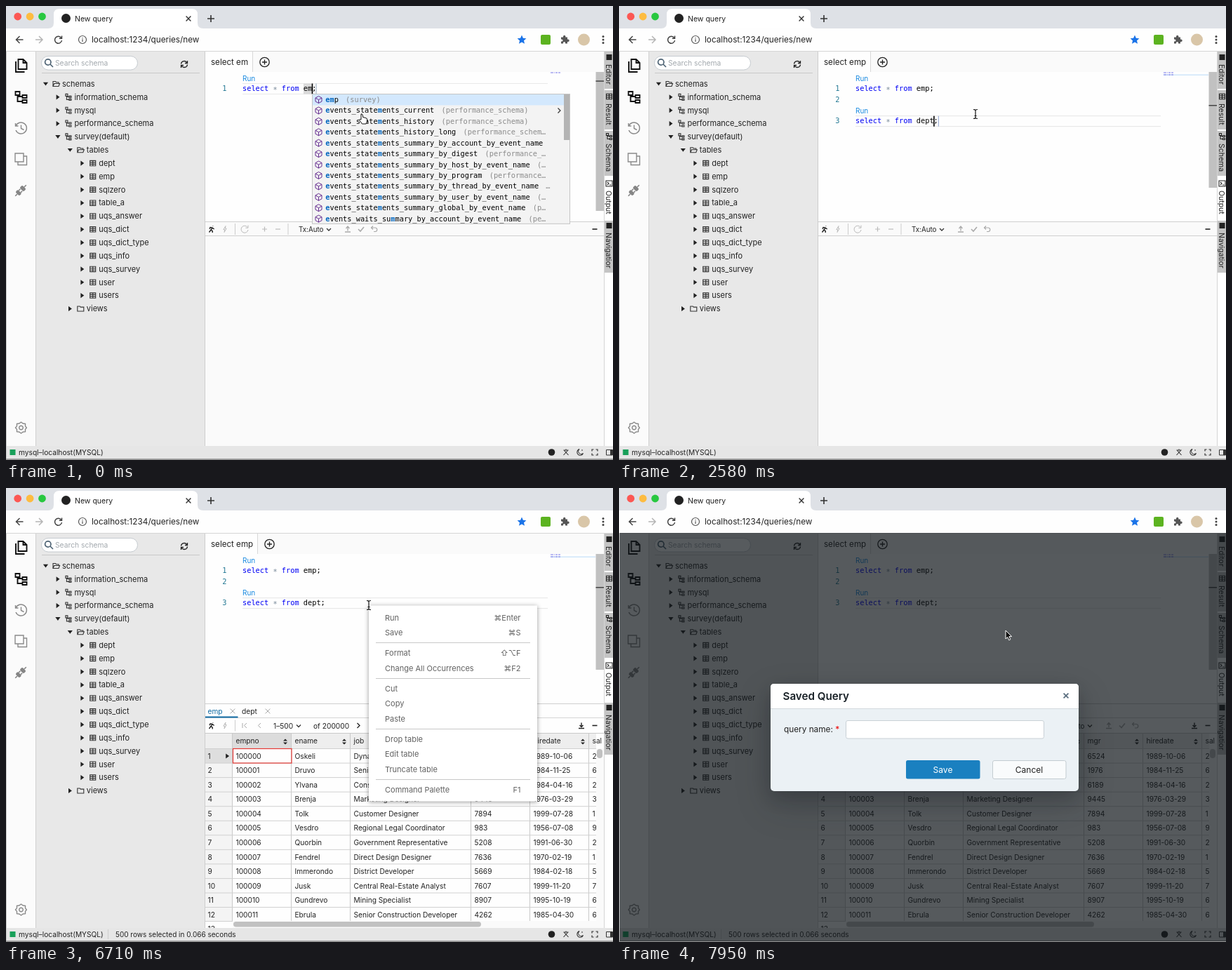
Recreate the animation shown at these times as an HTML page. Size 865 by 647 pixels, loop 8 s.

```html
<!DOCTYPE html>
<html lang="en">
<head>
<meta charset="utf-8">
<title>Query editor</title>
<style>
  html, body { margin: 0; width: 100%; height: 100%; overflow: hidden; background: #fff; }
  svg { display: block; width: 865px; height: 647px; }
  text { font: 11px Inter, "DejaVu Sans", sans-serif; fill: #222; white-space: pre; }
  .ten text, text.ten { font-size: 10.2px; }
  .mono text, text.mono { font: 10.3px "DejaVu Sans Mono", monospace; fill: #000; }
  .mono .key { fill: #0000f5; }
  .mono .star { fill: #778899; }
  .mono .match { fill: #0066bf; font-weight: bold; }
  .mono .note { fill: #8a8a8a; }
  .mono text.num { fill: #237893; }
  .mono text.lens { font: 10px Inter, sans-serif; fill: #1b8be0; }
  .raised { filter: drop-shadow(0 8px 12px rgba(16,22,26,.2)) drop-shadow(0 18px 23px rgba(16,22,26,.2)); }
</style>
</head>
<body>
<svg viewBox="0 0 865 647">
  <g id="frame"></g>
  <g id="live"></g>
</svg>
<script>
const LOOP = 8000, CH = 6.2, LEFT = 337, ROW = 15.42;

const rect = (x, y, w, h, fill, more = '') =>
  `<rect x="${x}" y="${y}" width="${w}" height="${h}" fill="${fill}" ${more}/>`;
const text = (x, y, s, more = '') => `<text x="${x}" y="${y}" ${more}>${s}</text>`;
const path = (d, stroke, more = '') => `<path d="${d}" fill="none" stroke="${stroke}" ${more}/>`;
const line = (x1, y1, x2, y2, color) => path(`M${x1},${y1}L${x2},${y2}`, color);
const dot = (x, y, r, fill, more = '') => `<circle cx="${x}" cy="${y}" r="${r}" fill="${fill}" ${more}/>`;

const shapes = {
  back: 'M5,0H-5M0,-5L-5,0L0,5',
  forward: 'M-5,0H5M0,-5L5,0L0,5',
  reload: 'M4.2,-2.6A5,5 0 1 0 5,1M5,-5.5V-1.8H1.3',
  plus: 'M-3.5,0H3.5M0,-3.5V3.5',
  newTab: 'M-5,0H5M0,-5V5',
  minus: 'M-3.5,0H3.5',
  cross: 'M-3.4,-3.4L3.4,3.4M3.4,-3.4L-3.4,3.4',
  info: 'M5.5,0A5.5,5.5 0 1 0 -5.5,0A5.5,5.5 0 1 0 5.5,0M0,-.7V3M0,-3V-1.8',
  down: 'M-3,-1.5L0,1.5L3,-1.5',
  right: 'M-1.5,-3.5L2,0L-1.5,3.5',
  left: 'M1.5,-3.5L-2,0L1.5,3.5',
  first: 'M2.5,-3.5L-1,0L2.5,3.5M-3.5,-3.5V3.5',
  last: 'M-2.5,-3.5L1,0L-2.5,3.5M3.5,-3.5V3.5',
  upload: 'M0,2.5V-3M-2.5,-1L0,-4L2.5,-1M-4,4H4',
  download: 'M0,-4V1.5M-2.5,-.5L0,2L2.5,-.5M-4,4H4',
  check: 'M-4,0L-1,3L4,-3',
  undo: 'M-2,-4.5L-4.5,-2L-2,.5M-4.5,-2H1.5A2.8,2.8 0 0 1 1.5,3.5H-1',
  run: 'M1.2,-2L-1,1L1.2,2.6V5M-1,1L-3.5,4.5M1.2,-2L-2,-2.4L-3,-.3M1.2,-2L3.6,0M1.8,-4.6v.6',
  bolt: 'M1,-4.5L-2.2,.7H-.2L-1,4.5L2.2,-1H.3Z',
  folder: 'M-4.5,-3.5H-1L0,-2.3H4.5V3.5H-4.5Z',
  openFolder: 'M-4.5,3.5V-3.5H-1L0,-2.3H3.5V-.5M-4.5,3.5L-2.8,-.5H5L3.5,3.5Z',
  schema: 'M-4,-4.5h3v3h-3zM1,-1.5h3v2h-3zM1,2.5h3v2h-3zM-2.5,-1.5V3.5H1M-2.5,-.5H1',
  grid: 'M-4,-3.7H4V3.7H-4ZM-4,-1.2H4M-4,1.3H4M0,-3.7V3.7',
  cube: 'M0,-5L4.5,-2.5V2.5L0,5L-4.5,2.5V-2.5ZM-4.5,-2.5L0,0L4.5,-2.5M0,0V5',
  snippet: 'M-5,-5H5V5H-5Z',
  keyword: 'M-5,-4H1M3,-4H5M-5,-1.3H-2M0,-1.3H5M-5,1.3H3M-5,4H0M2,4H5',
  files: 'M-4,-9H3L8,-4V5H-4ZM3,-9V-4H8M-7.5,-6V9H5',
  tree: 'M-8,-8h6v5h-6zM2,-3h6v4h-6zM2,4h6v4h-6zM-5,-3V6H2M-5,-1H2',
  history: 'M-7.5,-3A8,8 0 1 1 -7.5,3M-8,-7V-3H-4M0,-4.5V.5L4,2.5',
  copy: 'M-8,-8H4V4H-8ZM-4,4V8.5H8.5V-4H4',
  gear: 'M7.8,0L6,2.4L6,5.6L2.8,6L0,8L-2.8,6L-6,5.6L-6,2.4L-8,0L-6,-2.4L-6,-5.6L-2.8,-6L0,-8L2.8,-6L6,-5.6L6,-2.4ZM2.8,0A2.8,2.8 0 1 0 -2.8,0A2.8,2.8 0 1 0 2.8,0',
  terminal: 'M-4.5,-4H4.5V4H-4.5ZM-2.5,-2L-.5,0L-2.5,2M.5,2H3',
  expand: 'M-4,-1.5V-4H-1.5M1.5,-4H4V-1.5M4,1.5V4H1.5M-1.5,4H-4V1.5',
  moon: 'M-1,-4.5A4.5,4.5 0 1 0 4.5,1.5A4,4 0 0 1 -1,-4.5ZM2,-3h2',
  translate: 'M-3.5,-3H3.5M0,-4.5V-3M-2.5,-2.5L3.5,4M2.5,-2.5L-3.5,4',
  lens: 'M3,-1A4.2,4.2 0 1 0 -5.4,-1A4.2,4.2 0 1 0 3,-1M2,2L6,6'
};
const icon = (name, x, y, color = '#333', width = 1) =>
  path(shapes[name], color, `stroke-width="${width}" transform="translate(${x},${y})"`);
const solid = (d, x, y, fill = '#222') => `<path d="${d}" fill="${fill}" transform="translate(${x},${y})"/>`;
const ARROW_RIGHT = 'M-2.3,-3.6L2.6,0L-2.3,3.6Z', ARROW_DOWN = 'M-3.6,-2.3H3.6L0,2.6Z';

function browser() {
  let s = rect(0, 0, 865, 647, '#fefefe') + rect(0, 0, 865, 32, '#dee1e6');
  ['#fc5753', '#fdbc40', '#28c840'].forEach((c, i) => s += dot(16.7 + i * 17.4, 15, 5.4, c));
  s += '<path d="M60,32Q68,32 68,24V12Q68,4 76,4H265Q273,4 273,12V24Q273,32 281,32Z" fill="#fff"/>';
  s += dot(85.5, 17.5, 6.5, '#222') + text(98, 21.5, 'New query', 'style="font-size:10.5px"');
  s += icon('cross', 260, 18, '#333', 1.4) + icon('newTab', 292, 18, '#333', 1.6);
  s += icon('back', 19.5, 48, '#444', 1.5) + icon('forward', 47, 48, '#b5b5b5', 1.5);
  s += icon('reload', 74.5, 48, '#444', 1.5) + icon('info', 109, 48, '#555', 1.2);
  s += text(122, 52, 'localhost:1234/queries/new', 'style="font-size:11.75px"');
  s += solid('M0,-6.5L1.9,-2.2L6.4,-1.8L3,1.3L4,5.8L0,3.4L-4,5.8L-3,1.3L-6.4,-1.8L-1.9,-2.2Z', 735, 48, '#1a73e8');
  s += rect(762, 41, 14, 14, '#5cb320', 'rx="2"');
  s += solid('M-5,-3H-2V-4A1.7,1.7 0 0 1 1.4,-4V-3H4V0H5A1.7,1.7 0 0 1 5,3.4H4V6H1V5A1.5,1.5 0 0 0 -2,5V6H-5V3H-4A1.5,1.5 0 0 0 -4,0H-5Z', 796, 47.5, '#555');
  s += dot(823.5, 48, 8.5, '#d9c6a8');
  [-4.5, 0, 4.5].forEach(d => s += dot(851, 48 + d, 1.5, '#444'));
  return s + line(0, 64.5, 865, 64.5, '#d5d5d5');
}

function sidebar() {
  let s = rect(0, 65, 42, 562, '#fbfbfb') + rect(42, 65, 242, 562, '#e8e8e8');
  s += line(42.5, 65, 42.5, 627, '#d0d0d0') + line(283.5, 65, 283.5, 627, '#cdcdcd');
  s += icon('files', 21.5, 85, '#111', 1.9) + icon('tree', 21.5, 130, '#111', 1.9);
  s += icon('history', 21.5, 174, '#8a8a8a', 1.4) + icon('copy', 21, 218, '#8a8a8a', 1.4);
  s += `<g transform="translate(21,263) rotate(-45)">${rect(-7, -4, 5, 8, '#858585', 'rx="2"')}${rect(1.5, -4, 5.5, 8, '#858585', 'rx="2"')}` +
    path('M-11,0H-7M7,0H11M-2,-2H1M-2,2H1', '#858585', 'stroke-width="1.6"') + '</g>';
  s += icon('gear', 21.5, 601, '#888', 1.4);
  s += rect(50.5, 71.5, 137, 19.5, '#fff', 'rx="9.7" stroke="#c6cbd0"') + icon('lens', 61, 81, '#4f6475', 1.7);
  s += text(70, 85, 'Search schema', 'style="font-size:10.3px;fill:#a3a9ae"');
  s += path('M-4.5,-.5A4.5,4.5 0 0 1 4,-2M4.5,-5V-1.5H1M4.5,.5A4.5,4.5 0 0 1 -4,2M-4.5,5V1.5H-1', '#222', 'stroke-width="1.3" transform="translate(254,83)"');
  s += line(51, 95.5, 276, 95.5, '#c9c9c9');
  const tables = 'dept emp sqlzero table_a uqs_answer uqs_dict uqs_dict_type uqs_info uqs_survey user users'.split(' ');
  const nodes = [[0, 'schemas', 'openFolder', 1], [1, 'information_schema', 'schema'], [1, 'mysql', 'schema'],
    [1, 'performance_schema', 'schema'], [1, 'survey(default)', 'schema', 1], [2, 'tables', 'openFolder', 1],
    ...tables.map(n => [3, n, 'grid']), [2, 'views', 'folder']];
  nodes.forEach(([depth, name, shape, open], i) => {
    const x = 56.5 + depth * 17.4, y = 111 + i * 18.85;
    s += solid(open ? ARROW_DOWN : ARROW_RIGHT, x, y) + icon(shape, x + 15, y, '#333', 1.1) + text(x + 23.5, y + 3.8, name);
  });
  return s;
}

function rightStrip() {
  const tabs = [['Editor', 65, 118, 83], ['Result', 120, 176, 139, 'grid'], ['Schema', 178, 242, 196, 'schema'],
    ['Output', 244, 305, 263, 'terminal'], ['Navigatior', 306, 380, 323]];
  let s = rect(852, 65, 13, 562, '#fff');
  for (const [name, top, bottom, y, shape] of tabs) {
    s += rect(852.5, top, 13, bottom - top, name === 'Output' ? '#fff' : '#c4c4c4');
    s += shape ? icon(shape, 859.5, y - 10, '#222', 1.1) : rect(855.5, y - 14, 8, 8, '#222');
    s += `<text transform="translate(855.3,${y}) rotate(90)" style="font-size:10.5px">${name}</text>`;
  }
  return s + line(852.5, 65, 852.5, 627, '#d5d5d5');
}

function statusBar() {
  let s = rect(0, 627, 865, 18, '#e6e6e6') + rect(0, 645, 865, 2, '#9a9a9a') + rect(0, 65, 1, 580, '#c8c8c8');
  s += rect(5.5, 632, 8, 8, '#19a05a') + text(18, 639.5, 'mysql–localhost(MYSQL)', 'class="ten"');
  s += dot(777.5, 636, 4.8, '#222') + icon('translate', 798, 636, '#333', 1.1) + icon('moon', 818, 636, '#333', 1.1);
  return s + icon('expand', 839, 636, '#333', 1.2) + path('M855.5,632.5H864.5V640H855.5Z', '#333') + rect(861, 633, 3, 7, '#333');
}

const keywords = s => s.replace(/select|from/g, '<tspan class="key">$&</tspan>')
  .replace('* ', '<tspan class="star" dy="1.8">*</tspan><tspan dy="-1.8"> </tspan>');

function highlight(name, typed) {
  let i = 0;
  return [...name].map(c => c === typed[i] ? (i++, `<tspan class="match">${c}</tspan>`) : c).join('');
}

function popup(x, y, typed, rows) {
  const h = rows.length * ROW, long = rows.length > 9;
  let s = rect(x + .5, y + .5, 367, h - .2, '#f3f3f3', 'stroke="#c4c4c4"') + rect(x + 1, y + 1, long ? 358 : 366, ROW, '#d3e8fd');
  rows.forEach(([name, note, shape = 'cube'], i) => {
    const base = y + 12 + i * ROW, noteX = x + 29.5 + name.length * CH;
    s += icon(shape, x + 9.5, base - 3.5, shape === 'cube' ? '#652d90' : '#444', shape === 'snippet' ? .8 : 1);
    s += text(x + 19.3, base, highlight(name, typed));
    if (shape !== 'cube') return s += note ? text(x + 359, base, note, 'text-anchor="end" style="fill:#555"') : '';
    const full = `(${note})`, room = Math.floor((x + 335 - noteX) / CH);
    if (noteX < x + 335) s += text(noteX, base, full.length > room ? full.slice(0, Math.max(0, room - 1)) + '…' : full, 'class="note"');
  });
  return s + (long ? rect(x + 359, y + 1, 8, 65, '#b4b4b4') : '');
}

const PS = 'performance_schema';
const events = 'current history history_long summary_by_account_by_event_name summary_by_digest summary_by_host_by_event_name summary_by_program summary_by_thread_by_event_name summary_by_user_by_event_name summary_global_by_event_name'
  .split(' ').map(n => ['events_statements_' + n, PS]);
const inSchema = (schema, names) => names.split(' ').map(n => [n, schema]);
const lists = {
  em: [['emp', 'survey'], ...events, ['events_waits_summary_by_account_by_event_name', PS]],
  sel: [['sel', 'select * from t;', 'snippet'], ['select', '', 'keyword'], ['selc', '', 'snippet'], ['selw', '', 'snippet']],
  t: [['table_a', 'survey'], ...inSchema(PS, 'table_handles table_io_waits_summary_by_index_usage table_io_waits_summary_by_table table_lock_waits_summary_by_table threads'),
    ...inSchema('mysql', 'tables_priv time_zone time_zone_leap_second time_zone_name time_zone_transition time_zone_transition_type')],
  d: [['dept', 'survey'], ...inSchema('mysql', 'db default_roles'), ...inSchema(PS, 'data_lock_waits data_locks'), ['uqs_dict', 'survey'], ['uqs_dict_type', 'survey'],
    ...events.slice(4, 5), ...inSchema(PS, 'metadata_locks threads user_defined_functions prepared_statements_instances')],
  de: [['dept', 'survey'], ['default_roles', 'mysql'], ...events.slice(4, 5),
    ...inSchema(PS, 'user_defined_functions variables_by_thread events_errors_summary_by_user_by_error events_errors_summary_by_thread_by_error events_errors_summary_by_host_by_error')]
};

// Each step: start, third line's text, caret line, caret column, suggestion list.
const typing = [
  [0, '', 1, 16, 'em'], [170, '', 1, 17], [620, '', 1, 18], [890, '', 2, 0], [1070, '', 3, 0],
  [1250, 's', 3, 1, 'sel'], [1430, 'se', 3, 2, 'sel'], [1520, 'sel', 3, 3, 'sel'],
  [1780, 'select * from t;', 3, 15], [1870, 'select * from t;', 3, 15, 't'],
  [2140, 'select * from d;', 3, 15, 'd'], [2220, 'select * from de;', 3, 16, 'de'],
  [2580, 'select * from dept;', 3, 18], [3030, 'select * from dept;', 3, 19]
];
const pointer = [
  [0, 'hand', 508, 160], [170, 'beam', 508, 154], [3740, 'beam', 511, 155], [3830, 'beam', 515, 157], [3920, 'beam', 518, 160],
  [4010, 'beam', 518, 163], [4190, 'beam', 513, 176], [4270, 'beam', 508, 183], [6010, 'beam', 509, 180], [6100, 'beam', 512, 176],
  [6180, 'beam', 515, 170], [6270, 'beam', 517, 167], [6890, 'arrow', 523, 168], [6980, 'arrow', 532, 180], [7060, 'arrow', 541, 192],
  [7140, 'arrow', 547, 199], [7230, 'arrow', 551, 203]
];
const caretHidden = [[3570, 4010], [4540, 5020], [5740, 6010], [6530, LOOP]];
const within = (t, a, b) => t >= a && t < b;
const at = (steps, t) => steps.findLast(s => s[0] <= t);

function editor(t) {
  const [start, third, row, col, list] = at(typing, t);
  const lensed = t >= 1870, lines = start < 890 ? 1 : start < 1070 ? 2 : 3;
  const top = n => 110 + (n - 1) * 15.4 + (n === 3 && lensed ? 15.4 : 0);
  const tab = t >= 260 ? 358.5 : 351.5, y = top(row), x = LEFT + col * CH;
  let s = rect(284, 65, 568, 29, '#fafafa') + rect(284, 65, tab - 284, 29, '#fefefe') + line(tab, 65, tab, 94, '#d8d8d8');
  s += text(292, 84, t >= 260 ? 'select emp' : 'select em', 'style="font-size:11.6px"');
  s += dot(tab + 17, 80, 6.7, 'none', 'stroke="#222" stroke-width="1.3"') + icon('plus', tab + 17, 80, '#222', 1.4);
  s += '<g class="mono">' + path(`M${LEFT},${y + .5}H772M${LEFT},${y + 15.5}H772`, '#e9e9e9', 'stroke-width="1.2"');
  if (start === 0) s += rect(424, 110.5, 12.5, 15, '#dadada') + rect(441.5, 110.5, 1, 15, '#8fa3b8');
  if (within(t, 1780, 2140)) s += rect(LEFT + 14 * CH, y + .5, CH, 15, '#add6ff');
  if (within(t, 1780, 3030)) s += rect(LEFT + third.length * CH, y + .5, 1, 15, '#8fa3d0');
  s += text(LEFT, 107, 'Run', 'class="lens"') + (lensed ? text(LEFT, 153, 'Run', 'class="lens"') : '');
  s += text(LEFT, 121.2, keywords(`select * from ${t < 170 ? 'em' : 'emp'};`)) + text(LEFT, top(3) + 11.2, keywords(third));
  for (let n = 1; n <= lines; n++) s += text(308.3, top(n) + 11.2, n, 'class="num"');
  if (!caretHidden.some(([a, b]) => within(t, a, b))) s += rect(x - .5, y + .5, 1.6, 15, '#000');
  const thumb = [198, 185, 173][lines - 1] - (lensed ? 8 : 0);
  s += rect(840.5, 94, 11.5, thumb, '#c1c1c1') + rect(840.5, lensed ? 141 : 93.5 + 12.8 * lines, 11.5, 1.5, '#444');
  const mini = n => path(`M776,${n}h15`, '#7777e8', 'stroke-dasharray="4 1 1 1 3 1 3"');
  s += mini(95) + (lines > 2 ? rect(776, 97.5, 64, 1.5, '#cfe6fa') : '') + (third.length > 5 ? mini(98) : '') + '</g>';
  if (!list) return s;
  const typed = list === 'sel' ? third : list === 't' ? '' : list;
  s += `<g class="mono">${popup(Math.round(x), Math.round(y + 15.2), typed, lists[list])}</g>`;
  return s + (list === 'em' ? icon('right', 788, 149, '#333', 1.2) : '');
}

function actions(dx, dy, active) {
  const y = 318 + dy, on = active ? '#333' : '#bbb';
  let s = icon('reload', 340 + dx, y, on) + icon('plus', 368.5 + dx, y, on, 1.2) + icon('minus', 387.5 + dx, y, on, 1.2);
  s += line(402 + dx, y - 8, 402 + dx, y + 8, '#ccc') + text(417 + dx, y + 4, 'Tx:Auto', 'style="font-size:9.8px"') + icon('down', 460 + dx, y + .5, '#333', 1.3);
  s += icon('upload', 487 + dx, y, '#aaa', 1.3) + icon('check', 506 + dx, y, '#aaa', 1.6) + icon('undo', 525 + dx, y, '#aaa', 1.2);
  return s + icon('minus', 839, y, '#222', 1.6);
}

const runIcons = (y, on) => icon('run', 293, y, on ? '#128a12' : '#222', 1.4) +
  icon('bolt', 312, y, on ? '#e8112d' : '#bbb', on ? 1.8 : 1) + line(326.5, y - 8, 326.5, y + 8, '#ccc');

function output(t) {
  let s = rect(284, 308, 568, 319, '#fafafa') + line(284, 307.5, 852, 307.5, '#cfcfcf') + line(284, 327.5, 852, 327.5, '#cfcfcf');
  s += runIcons(318, t >= 5020) + actions(0, 0, false);
  if (t < 5020) return s;
  s += rect(686, 632, 77, 7.5, '#1479bd', 'rx="3.7"');
  for (let x = 690; x < 757; x += 9) s += path(`M${x},639l5,-6.5`, '#3c97d0', 'stroke-width="3"');
  if (t < 5110) return s;
  return s + dot(552, 497, 19, '#f0f', 'opacity=".25" style="filter:blur(6px)"') + rect(542.5, 452, 50.5, 51, '#f0f') +
    rect(543, 486.5, 16, 16, '#16a9fb', 'stroke="#a070ff" stroke-width=".7"');
}

const columns = [['empno', 323], ['ename', 407], ['job', 491], ['mgr', 663], ['hiredate', 747], ['sal', 831]];
const people = `Oskeli|Dynamic Planner|6524|1989-10-06|2
Druvo|Senior Hospitality Architect|1976|1984-11-25|6
Ylvana|Consulting Engineer|6189|1984-04-16|2
Brenja|Marketing Designer|9445|1976-03-29|3
Tolk|Customer Designer|7894|1999-07-28|1
Vesdro|Regional Legal Coordinator|983|1956-07-08|9
Quorbin|Government Representative|5208|1991-06-30|2
Fendrel|Direct Design Designer|7636|1970-02-19|1
Immerondo|District Developer|5669|1984-02-18|5
Jusk|Central Real-Estate Analyst|7607|1999-11-20|7
Gundrevo|Mining Specialist|8907|1995-10-19|6
Ebrula|Senior Construction Developer|4262|1985-04-30|6`.split('\n').map((r, i) => [100000 + i, ...r.split('|')]);

const results = (() => {
  let s = '<g class="ten">' + rect(284, 308, 568, 319, '#fefefe') + line(284, 307.5, 852, 307.5, '#cfcfcf') + line(284, 327.5, 852, 327.5, '#d5d5d5');
  s += text(287.5, 321.5, 'emp', 'style="fill:#106ba3"') + text(336, 321.5, 'dept') + rect(284, 325.5, 46.5, 2, '#106ba3');
  s += icon('cross', 323, 318, '#aaa') + icon('cross', 373, 318, '#aaa') + runIcons(338.5, false);
  s += icon('first', 340.5, 338.5, '#aaa') + icon('left', 361.5, 338.5, '#aaa') + text(381, 342.5, '1–500') + icon('down', 417, 339, '#333', 1.3);
  s += text(438, 342.5, 'of 200000') + icon('right', 502, 338.5, '#222', 1.3) + icon('last', 523, 338.5, '#222', 1.3) + line(537.5, 330, 537.5, 347, '#ccc');
  s += actions(211, 20.5, true) + icon('download', 820, 338.5, '#222', 1.4);
  s += rect(284, 349, 557, 22, '#eee') + rect(323, 349, 84, 22, '#dcdcdc') + rect(284, 371, 39, 246, '#f4f4f4') + rect(284, 371, 39, 21, '#dedede');
  columns.forEach(([name, x], i) => {
    s += text(x + 4.5, 364, name) + line(x - .5, 349, x - .5, 617, '#c9c9c9');
    if (i < 5) s += solid('M-3,-1H3L0,-4ZM-3,1H3L0,4Z', columns[i + 1][1] - 9, 361.5);
  });
  people.forEach((cells, r) => {
    const y = 371.5 + r * 20.55;
    s += line(284, y, 841, y, '#d0d0d0') + text(287.5, y + 14.2, r + 1);
    cells.forEach((c, i) => s += text(columns[i][1] + 4.5, y + 14.2, c));
  });
  s += line(284, 349.5, 852, 349.5, '#c9c9c9') + rect(323.5, 371.5, 83.5, 20.5, 'none', 'stroke="#e53935" stroke-width="1.2"') + solid(ARROW_RIGHT, 315.5, 382);
  s += rect(323, 617, 529, 10, '#fafafa') + rect(324, 618, 353, 7.5, '#c1c1c1', 'rx="3.7"') + rect(841, 371, 11, 246, '#fafafa') + rect(842, 372, 8, 13, '#c1c1c1', 'rx="4"');
  s += line(284, 617.5, 323, 617.5, '#d0d0d0') + '<svg x="284" y="618" width="39" height="9" style="width:39px;height:9px">' + text(3.5, 14, 13) + '</svg>';
  return s + line(145.5, 629, 145.5, 643, '#cfcfcf') + text(156, 639.5, '500 rows selected in 0.066 seconds', 'style="font-size:10px"') + '</g>';
})();

const menuItems = [['Run', 184.5, '⌘Enter'], ['Save', 206, '⌘S'], ['Format', 235, '⇧⌥F'], ['Change All Occurrences', 256.8, '⌘F2'],
  ['Cut', 286], ['Copy', 307.3], ['Paste', 328.7], ['Drop table', 357.7], ['Edit table', 379.3], ['Truncate table', 401], ['Command Palette', 430, 'F1']];
function menu(t) {
  const hovered = t < 6980 ? '' : t < 7140 ? 'Run' : 'Save';
  let s = rect(517, 167.5, 240, 279, '#fff', 'style="filter:drop-shadow(0 1px 3px rgba(0,0,0,.4))"');
  for (const y of [220.5, 271.5, 343.5, 415.5]) s += line(527, y, 747, y, '#c8c8c8');
  for (const [name, y, keys = ''] of menuItems) {
    const fill = `style="fill:${name === hovered ? '#fff' : '#616161'}"`;
    if (name === hovered) s += rect(518, y - 10.7, 238, 21.4, '#0060c0');
    s += text(540, y + 4, name, fill) + text(733.5, y + 4, keys, 'text-anchor="end" ' + fill);
  }
  return s;
}

function dialog(t) {
  const done = t >= 7950;
  let s = rect(1, 64, 864, 582, '#10161a', `opacity="${done ? .7 : .35}"`);
  s += `<g opacity="${done ? 1 : .6}" transform="translate(435.5,355.5) scale(${done ? 1 : .85}) translate(-435.5,-355.5)">`;
  s += rect(216, 279, 439, 153, '#ebf1f5', 'rx="5" class="raised"');
  s += '<path d="M216,314V284Q216,279 221,279H650Q655,279 655,284V314Z" fill="#fff"/>' + line(216, 314.5, 655, 314.5, '#d3dade');
  s += text(233.5, 302, 'Saved Query', 'style="font-size:15.2px;font-weight:600;fill:#182026"') + icon('cross', 637, 296, '#5c7080', 1.8);
  s += text(235, 348, 'query name: <tspan fill="#e00">*</tspan>', 'style="font-size:11.8px"') + rect(323.5, 331.5, 282, 25.5, '#fff', 'rx="2.5" stroke="#c9d1d6"');
  s += rect(409, 388, 105.5, 26.5, '#1a80c0', 'rx="2.5"') + text(461.5, 405.5, 'Save', 'text-anchor="middle" style="font-size:12px;fill:#fff"');
  s += rect(532.5, 388.5, 104.5, 26, '#f9fbfc', 'rx="2.5" stroke="#c3ccd1"') + text(584.5, 405.5, 'Cancel', 'text-anchor="middle" style="font-size:12px"');
  return s + '</g>';
}

function mouse(t) {
  const [, kind, x, y] = at(pointer, t);
  const place = `transform="translate(${x},${y})"`;
  if (kind === 'beam') {
    const d = 'M-3,-6.5Q0,-6.5 0,-5Q0,-6.5 3,-6.5M0,-5V5M-3,6.5Q0,6.5 0,5Q0,6.5 3,6.5M-1.5,2.5H1.5';
    return path(d, '#fff', `stroke-width="2.4" ${place}`) + path(d, '#111', `stroke-width="1.2" ${place}`);
  }
  const d = kind === 'arrow' ? 'M0,0V12L2.7,9.5L4.7,13.8L6.8,12.8L4.9,8.6H8.6Z'
    : 'M-2,-6Q-.8,-7 0,-5L1,-1Q2,-2 3,-.7Q4.2,-1.5 5,0Q6.5,-.5 6.5,1.5V4Q6,6 5,8H-.5L-4.5,2.5Q-4.5,.5 -2,2Z';
  return `<path d="${d}" fill="${kind === 'arrow' ? '#111' : '#fff'}" stroke="${kind === 'arrow' ? '#fff' : '#111'}" ${place}/>`;
}

function scene(t) {
  let s = (t < 5740 ? output(t) : results) + editor(t);
  if (within(t, 6710, 7770)) s += menu(t);
  if (t >= 7860) s += dialog(t);
  return s + mouse(t);
}

document.getElementById('frame').innerHTML = browser() + sidebar() + rightStrip() + statusBar();
const live = document.getElementById('live');
let shown = '';
function tick() {
  const next = scene(performance.now() % LOOP);
  if (next !== shown) live.innerHTML = shown = next;
  requestAnimationFrame(tick);
}
tick();
</script>
</body>
</html>
```
